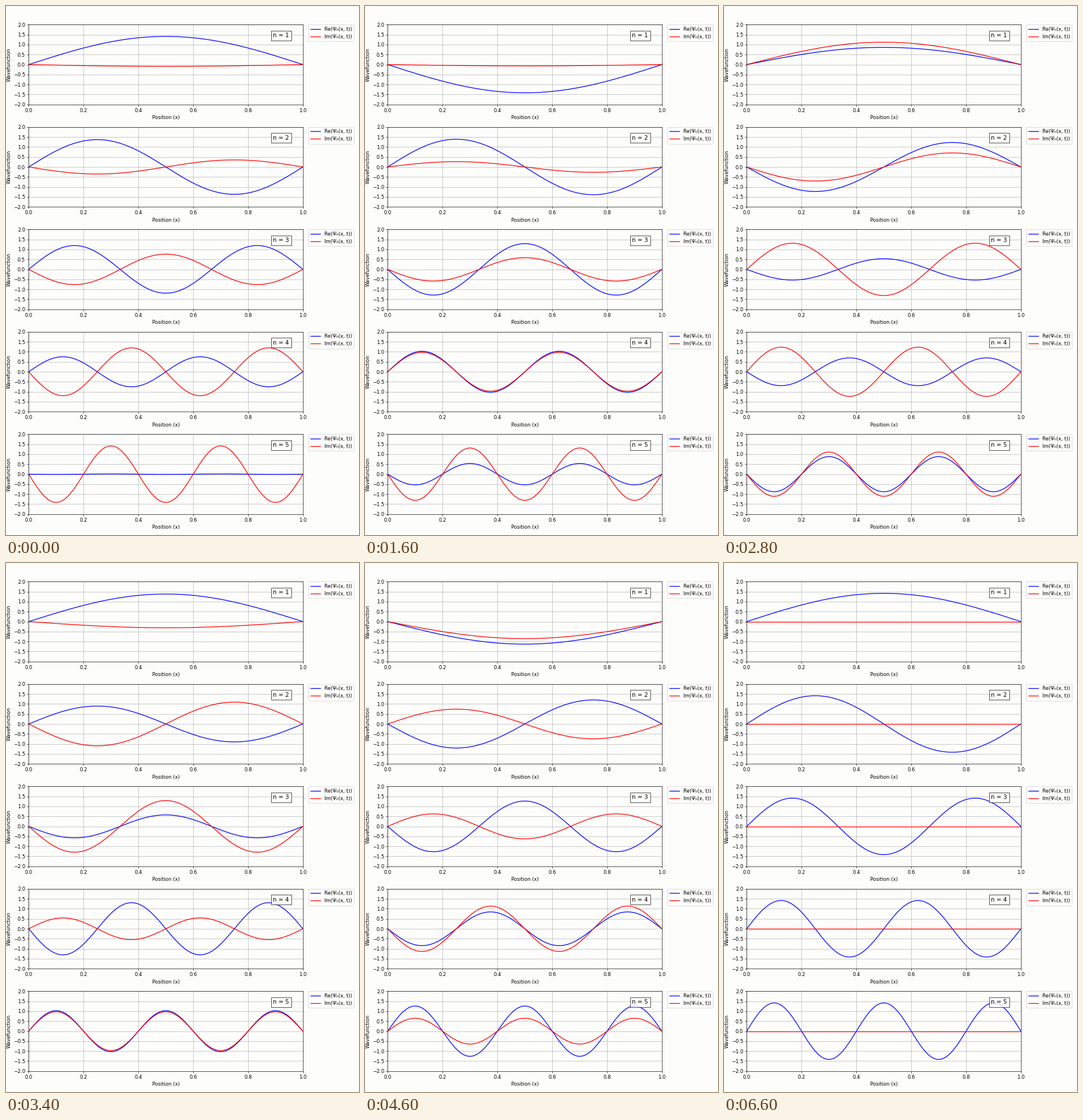
Animation of 611x917 px, one loop 6.7 s. Source, as a matplotlib script:

```python
import numpy as np
import matplotlib.pyplot as plt
from matplotlib.animation import FuncAnimation

W, H, DPI = 611, 917, 61.1
BG = "#fdfefc"
FRAMES, INTERVAL = 67, 100
LEFT, RIGHT = 39.3, 513.9
TOP, HEIGHT, PITCH = 32.3, 138.5, 177.5

plt.rcParams.update({
    "font.family": "DejaVu Sans",
    "figure.facecolor": BG,
    "axes.facecolor": BG,
    "savefig.facecolor": BG,
})

# The tiny margin keeps the pixel size from rounding down.
fig = plt.figure(figsize=((W + 1e-6) / DPI, (H + 1e-6) / DPI), dpi=DPI)
x = np.linspace(0, 1, 500)


def make_panel(n):
    bottom = H - (TOP + PITCH * (n - 1) + HEIGHT)
    ax = fig.add_axes([LEFT / W, bottom / H, (RIGHT - LEFT) / W, HEIGHT / H])
    ax.set(xlim=(0, 1), ylim=(-2, 2), yticks=np.arange(-2, 2.1, 0.5),
           xlabel="Position (x)", ylabel="Wavefunction")
    ax.grid(True)
    re, = ax.plot([], [], color="blue", label="Re(Ψₙ(x, t))")
    im, = ax.plot([], [], color="red", label="Im(Ψₙ(x, t))")
    ax.legend(loc="upper left", bbox_to_anchor=(1.02, 1), borderaxespad=0)
    ax.text(0.95, 0.9, f"n = {n}", transform=ax.transAxes, fontsize=12,
            ha="right", va="top", bbox=dict(facecolor=BG, alpha=0.8))
    return n, re, im


panels = [make_panel(n) for n in range(1, 6)]


def update(i):
    # Two ground-state periods over 199 time steps, shown every third step.
    t = 4 * np.pi * (1 + 3 * i) / 199
    for n, re, im in panels:
        psi = np.sqrt(2) * np.sin(n * np.pi * x) * np.exp(-1j * n**2 * t)
        re.set_data(x, psi.real)
        im.set_data(x, psi.imag)
    return [line for _, *lines in panels for line in lines]


anim = FuncAnimation(fig, update, frames=FRAMES, interval=INTERVAL,
                     repeat=True, repeat_delay=0)
plt.show()
```
